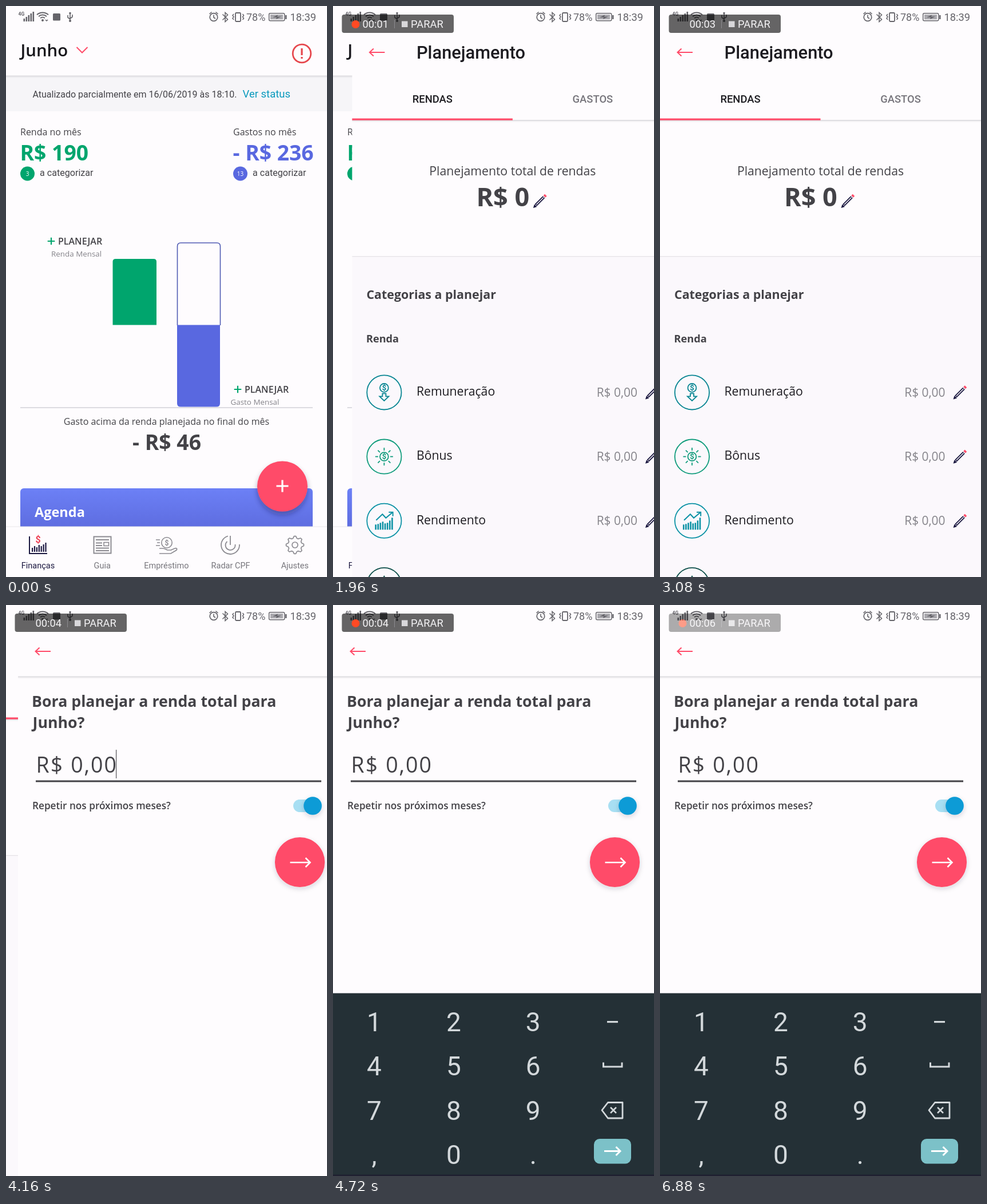
These frames come from a looping animation (561x998 px, 6920 ms). An HTML page:

```html
<!DOCTYPE html>
<html lang="pt-BR">
<head>
<meta charset="utf-8">
<title>Planejamento</title>
<style>
  html, body { margin: 0; width: 100%; height: 100%; overflow: hidden; background: #fefcfe; }
  svg { display: block; width: 100vw; height: 100vh; }
  text { white-space: pre; }
</style>
</head>
<body>
<svg id="stage" viewBox="0 0 561 998" xmlns="http://www.w3.org/2000/svg"></svg>
<script>
const LOOP = 6920, TICK = 40, WIDTH = 561;
const SANS = "'Open Sans', sans-serif", ROBOTO = "Roboto, sans-serif";
const INK = "#434247", GRAY = "#85848a", NAVY = "#1b1840", RED = "#ff4b69";
const GREEN = "#00a56d", BLUE = "#5968e0", PAPER = "#fefcfe";

const text = (x, y, value, size, fill = INK, { font = SANS, weight = 400, anchor = "start", more = "" } = {}) =>
  `<text x="${x}" y="${y}" font-family="${font}" font-size="${size}" font-weight="${weight}" fill="${fill}" text-anchor="${anchor}" ${more}>${value}</text>`;
const rect = (x, y, w, h, fill, r = 0, more = "") =>
  `<rect x="${x}" y="${y}" width="${w}" height="${h}" rx="${r}" fill="${fill}" ${more}/>`;
const disc = (x, y, r, fill, more = "") => `<circle cx="${x}" cy="${y}" r="${r}" fill="${fill}" ${more}/>`;
const ring = (x, y, r, color, width) => disc(x, y, r, "none", `stroke="${color}" stroke-width="${width}"`);
const line = (d, color, width, more = "") =>
  `<path d="${d}" fill="none" stroke="${color}" stroke-width="${width}" ${more}/>`;
const group = (id, body) => `<g id="${id}">${body}</g>`;
const at = (x, y, body) => `<g transform="translate(${x} ${y})">${body}</g>`;
const plus = (x, y, r, color, width) => line(`M${x - r} ${y}h${2 * r}M${x} ${y - r}v${2 * r}`, color, width);
const dollar = (x, y, size, color) => text(x, y, "$", size, color, { font: ROBOTO, weight: 700, anchor: "middle" });
const roboto = (weight = 400, anchor = "start") => ({ font: ROBOTO, weight, anchor });
const headerEdge = y => rect(0, y, WIDTH, 2, "#dfdee2") + rect(0, y + 2, WIDTH, 2, "#000", 0, 'fill-opacity=".03"');

const pencil = (x, y) => at(x, y,
  line("M4.500 18.500L18.500 4.500", NAVY, 5) + line("M5.500 17.500L18 5", PAPER, 1.4) +
  line("M19.500 3.500L22 1", RED, 5) + `<path d="M0 23.500l2-6.500 4.500 4.500z" fill="${NAVY}"/>`);
const backArrow = line("M57 81H30M37.500 74.500L30.500 81L37.500 87.500", RED, 2);
const forwardArrow = (x, y, half, head, width) =>
  line(`M${x - half} ${y}h${2 * half}m${-head} ${-head}l${head} ${head}l${-head} ${head}`, "#fff", width);

function statusBar() {
  const c = "#65646a", bars = [5, 8, 11, 14, 17]
    .map((h, i) => rect(30.5 + i * 4, 27 - h, 2.6, h, c)).join("");
  const wifi = [5, 9, 13].map(r =>
    line(`M${64 - r * 0.77} ${25 - r * 0.75}A${r * 1.15} ${r * 1.15} 0 0 1 ${64 + r * 0.77} ${25 - r * 0.75}`, c, 2)).join("");
  return text(21.5, 17, "4G", 8.5, c, roboto(700)) + bars + wifi + disc(64, 25, 2, c) +
    line("M69 24l2 2 2-2", c, 1.5) + rect(82, 13, 13, 12.5, c, 1.5) +
    line("M112 12V26M108 16v4l4 3M116 15v4l-4 3", c, 1.6) + disc(112, 26, 2, c) + disc(112, 12.5, 1.8, c) +
    ring(363, 19.5, 6.8, c, 1.7) + line("M363 15.500V20l3 2M355.500 14l4-3.500M370.500 14l-4-3.500", c, 1.6) +
    line("M378.500 14.500l9 9-4.500 4V11.500l4.500 4-9 9", c, 1.5) +
    rect(401, 12, 9, 15, "none", 1.5, `stroke="${c}" stroke-width="1.8"`) +
    line("M398 14l-2 2.500 2 2.500-2 2.500 2 2.500M413.500 14l2 2.500-2 2.500 2 2.500-2 2.500", c, 1.5) +
    text(420, 26, "78%", 18, c, roboto()) +
    rect(459.7, 12.7, 27, 13, "none", 2, `stroke="${c}" stroke-width="1.5"`) +
    rect(462, 15, 22, 8.5, "#aaa9ae") + rect(488, 16, 2.5, 7, c) +
    `<path d="M466 20l9-4.500-1 3h7l-9 4.500 1-3z" fill="${c}"/>` +
    text(496.5, 26, "18:39", 18.3, c, roboto());
}

function tabIcons() {
  const c = "#8c8b91";
  const columns = [7, 10, 8, 12, 10, 13, 16]
    .map((h, i) => rect(45 + i * 3.9, 954 - h, 2.2, h, NAVY)).join("");
  const gear = Array.from({ length: 32 }, (_, i) => {
    const a = (i - 0.5) * Math.PI / 16, r = i % 4 < 2 ? 15.5 : 12;
    return `${505 + r * Math.sin(a)},${942 - r * Math.cos(a)}`;
  }).join(" ");
  return line("M41 927V957H72", NAVY, 2) + columns + dollar(56, 938, 16, "#ee4055") +
    rect(153.5, 927.5, 30, 29, "none", 0, `stroke="${c}" stroke-width="2"`) +
    line("M157 933H180M157 938.500H168M157 943H168M157 947.500H180M157 952H180", c, 1.8) +
    rect(171, 937.5, 8.5, 6, "none", 0, `stroke="${c}" stroke-width="1.6"`) +
    ring(281, 938, 9.2, c, 1.6) + dollar(281, 942.5, 12, c) +
    line("M262 933h7M264 938h5M262 943h7M268 948h6c5 0 6 3 9 3h6M268 957h20l10-6c2-3-1-4-3-3l-7 3", c, 1.7) +
    line("M388 926.500A16 16 0 1 0 408 941M392 926V942M386.500 936A8.500 8.500 0 1 0 400.500 941", c, 1.8) +
    `<polygon points="${gear}" fill="none" stroke="${c}" stroke-width="1.7" stroke-linejoin="round"/>` +
    ring(505, 942, 5, c, 1.7);
}

function summary(x, label, amount, color, count) {
  return text(x, 226, label, 16) + text(x - 0.5, 270, amount, 37.3, color, { weight: 700 }) +
    disc(x + 12.5, 293, 12.5, color) + text(x + 12.5, 296.5, count, 10, "#fff", { anchor: "middle" }) +
    text(x + 34, 297, "a categorizar", 16.1, INK, roboto());
}

function planLink(x, y, labelX, label) {
  return plus(x + 6.5, y - 6, 6.3, GREEN, 2.2) + text(x + 18.5, y, "PLANEJAR", 16, INK, { weight: 600 }) +
    text(labelX, y + 21, label, 13.4, GRAY);
}

function home() {
  const tabs = ["Finanças", "Guia", "Empréstimo", "Radar CPF", "Ajustes"].map((name, i) =>
    text(56 + i * 112.2, 983, name, 14.5, i ? "#77767c" : NAVY, roboto(400, "middle"))).join("");
  return rect(0, 0, WIDTH, 998, PAPER) +
    text(25.5, 88, "Junho", 29.4, "#17161b", { weight: 600 }) +
    line("M123.500 72L133 81.500L142.500 72", RED, 2) +
    ring(517, 83, 15.8, "#e6474d", 2.8) + line("M517 74V86M517 89V92", "#e6474d", 3.2) +
    rect(0, 123, WIDTH, 61, "#f6f5f8") + headerEdge(121.5) +
    text(46.5, 160, "Atualizado parcialmente em 16/06/2019 às 18:10.", 16, INK, roboto()) +
    text(413.5, 160, "Ver status", 18.5, "#0a9abd", roboto()) +
    summary(25, "Renda no mês", "R$ 190", GREEN, 3) +
    summary(397, "Gastos no mês", "- R$ 236", BLUE, 13) +
    planLink(72.5, 417, 79, "Renda Mensal") + planLink(398.5, 676, 392.5, "Gasto Mensal") +
    `<path d="M186.500 557.500V447q0-5 5-5H258q5 0 5 5V557.500z" fill="${GREEN}"/>` +
    line("M299.500 558V420q0-6 6-6H368.500q6 0 6 6V558", "#4f5ab3", 1.6) +
    `<path d="M299 557.500H374V694.500q0 6-6 6H305q-6 0-6-6z" fill="${BLUE}"/>` +
    rect(25, 701, 511, 2, "#dcdbe1") +
    text(280.5, 732, "Gasto acima da renda planejada no final do mês", 16, INK, { anchor: "middle" }) +
    text(281, 776, "- R$ 46", 37.3, INK, { weight: 700, anchor: "middle" }) +
    rect(25, 843, 511, 90, "url(#card)", 6) + text(50, 893, "Agenda", 23.5, "#fff", { weight: 700 }) +
    disc(483, 839.5, 44, RED, 'filter="url(#lift)"') + plus(483, 839, 10.5, "#fff", 3.2) +
    rect(0, 910, WIDTH, 88, PAPER) + rect(0, 909.5, WIDTH, 1, "#e9e8ec") + tabIcons() + tabs;
}

const categoryIcons = [
  c => ring(0, -8, 7.4, c, 1.8) + dollar(0, -3.5, 13, c) + line("M-3 2V7H-8L0 14.500L8 7H3V2z", c, 1.8),
  c => ring(0, 0, 7.4, c, 1.8) + dollar(0, 4.5, 13, c) + Array.from({ length: 8 }, (_, i) =>
    `<path d="M0-10.500V-15.500" stroke="${c}" stroke-width="1.8" transform="rotate(${i * 45})"/>`).join(""),
  c => [9, 10, 12, 14, 11, 12, 16, 21].map((h, i) => rect(-16 + i * 4.1, 15.5 - h, 2.6, h, c)).join("") +
    line("M-14-1L-3-11.500L3-5L15-15M8-15H15.200V-8", c, 2),
  c => line("M-8 0L0-15L8 0", c, 2),
];

function category(name, color, i) {
  const y = 675.4 + i * 112.2;
  return ring(56, y, 30.1, color, 1.8) + at(56, y, categoryIcons[i](color)) +
    text(112.5, y + 5.8, name, 21.2, "#1d1c21") +
    text(498.5, y + 7.6, "R$ 0,00", 20.9, GRAY, { anchor: "end" }) + pencil(512.5, y - 11.4);
}

function planning() {
  const rows = [["Remuneração", "#078592"], ["Bônus", "#109c7c"], ["Rendimento", "#0b92a5"], ["Outros", "#0c4e49"]];
  return rect(0, 0, WIDTH, 998, PAPER) + backArrow +
    text(112.5, 92, "Planejamento", 30.8, "#1d1c21", roboto(500)) +
    text(140.5, 169, "RENDAS", 18.4, "#1d1c21", roboto(500, "middle")) +
    text(420.5, 169, "GASTOS", 18.4, "#77757c", roboto(500, "middle")) +
    headerEdge(199) + rect(0, 196.5, 280.5, 3.2, RED) +
    text(280.5, 296, "Planejamento total de rendas", 21.2, INK, { anchor: "middle" }) +
    text(217, 350, "R$ 0", 45, INK, { weight: 700 }) + pencil(316.5, 329.5) +
    rect(0, 438, WIDTH, 560, "#fbf8fc") + rect(0, 437, WIDTH, 1.5, "#e8e6ea") +
    text(25, 512, "Categorias a planejar", 21.4, INK, { weight: 700 }) +
    text(24.5, 588, "Renda", 18.2, INK, { weight: 700 }) +
    rows.map(([name, color], i) => category(name, color, i)).join("");
}

function entry() {
  return rect(0, 0, WIDTH, 998, PAPER) + backArrow + headerEdge(124.5) +
    text(24, 178, "Bora planejar a renda total para", 26.75, INK, { weight: 700 }) +
    text(25.5, 214.5, "Junho?", 26.75, INK, { weight: 700 }) +
    text(31.5, 293, "R$ 0,00", 37.5, INK, { more: 'letter-spacing="2.1"' }) +
    group("caret", rect(171, 253, 1.2, 50, "#55545a")) + rect(31, 306.5, 499, 3, INK) +
    text(25, 357, "Repetir nos próximos meses?", 17.2, INK, { weight: 600 }) +
    rect(481, 340, 44, 22, "#a8dff3", 11) + disc(515, 351, 15.8, "#079bd6", 'filter="url(#soft)"') +
    disc(492.5, 449.5, 43.6, RED, 'filter="url(#soft)"') + forwardArrow(493, 450, 17.5, 8, 2.6);
}

function keyboard() {
  const c = "#d3d8db";
  const keys = ["123", "456", "789", ",0."].map((row, r) => [...row].map((key, i) =>
    text(72 + i * 138.9, 745 + r * 77.4, key, 46, c, roboto(400, "middle"))).join("")).join("");
  return rect(0, 678.5, WIDTH, 322, "#243036") + rect(0, 995.5, WIDTH, 3, "#1f2030") + keys +
    rect(479, 727, 19, 3.2, c) + line("M472.500 799.500V807H505V799.500", c, 3) +
    line("M480.500 869.500H506V897H480.500L470 883z", c, 2.8, 'stroke-linejoin="round"') +
    line("M485 878l10 10m0-10l-10 10", c, 2.6) +
    rect(456, 933, 65, 43.5, "#7cc1c8", 10) + forwardArrow(488, 954.5, 14, 7.5, 3);
}

function recorder() {
  return rect(15.5, 15, 195.5, 32, "#000", 4, 'fill-opacity=".6"') +
    group("dot", disc(39.5, 32, 7, "#ff4a24")) +
    text(51.5, 38, "00:00", 18.3, "#f4f3f5", { ...roboto(), more: 'id="clock"' }) +
    rect(107, 24, 1, 15, "#8b8a8e") + rect(120, 26.5, 10.5, 10.5, "#d8d7da") +
    text(136, 38, "PARAR", 18.3, "#f4f3f5", roboto());
}

const stage = document.getElementById("stage");
stage.innerHTML = `<defs>
  <linearGradient id="card" x2="0" y2="1"><stop stop-color="#6c80f6"/><stop offset=".75" stop-color="#5e6de0"/></linearGradient>
  <filter id="lift" x="-30%" y="-30%" width="160%" height="160%"><feDropShadow dx="0" dy="6" stdDeviation="5" flood-color="#201c40" flood-opacity=".35"/></filter>
  <filter id="soft" x="-30%" y="-30%" width="160%" height="160%"><feDropShadow dx="0" dy="3" stdDeviation="4" flood-color="#201c40" flood-opacity=".18"/></filter>
</defs>` + home() + group("planning", planning()) + group("entry", entry()) +
  group("keyboard", keyboard()) + statusBar() +
  group("touch", disc(0, 0, 17.3, "#fff", 'fill-opacity=".7" stroke="#cbc8e2" stroke-width="2.2"')) +
  group("recorder", recorder());

const part = Object.fromEntries([...stage.querySelectorAll("g[id], #clock")].map(el => [el.id, el]));
const clamp = v => Math.min(1, Math.max(0, v));
const place = (el, x, y) => el.setAttribute("transform", `translate(${x} ${y})`);
const fade = (el, opacity) => {
  el.setAttribute("opacity", opacity);
  el.style.display = opacity > 0 ? "" : "none";
};

// Quartic ease-out from the right edge.
const slide = (t, start) => WIDTH * (1 - clamp((t - start) / 500)) ** 4;

function draw(t) {
  place(part.planning, slide(t, 1707), 0);
  place(part.entry, slide(t, 3880), 0);

  const rise = clamp((t - 4200) / 160);
  place(part.keyboard, 0, 100 * (1 - rise));
  fade(part.keyboard, rise);
  fade(part.caret, t < 4200 || Math.floor((t - 4200) / 500) % 2 === 0 ? 1 : 0);

  const second = t > 3000;
  place(part.touch, second ? 329 : 91, second ? 341 : 405.5);
  const since = t - (second ? 3600 : 1440);
  fade(part.touch, since < 0 ? 0 : clamp(1 - (since - 120) / 120));

  const running = t - 80;
  part.clock.textContent = "00:0" + Math.max(0, Math.floor(running / 1000));
  fade(part.dot, clamp((running % 1000 - 480) / 120));
  fade(part.recorder, t < 40 ? 0 : t < 160 ? 0.55 : clamp(1 - (t - 6760) / 260));
}

const begin = performance.now();
function tick() {
  const t = (performance.now() - begin) % LOOP;
  draw(Math.floor(t / TICK) * TICK);
  requestAnimationFrame(tick);
}
draw(0);
requestAnimationFrame(tick);
</script>
</body>
</html>
```
